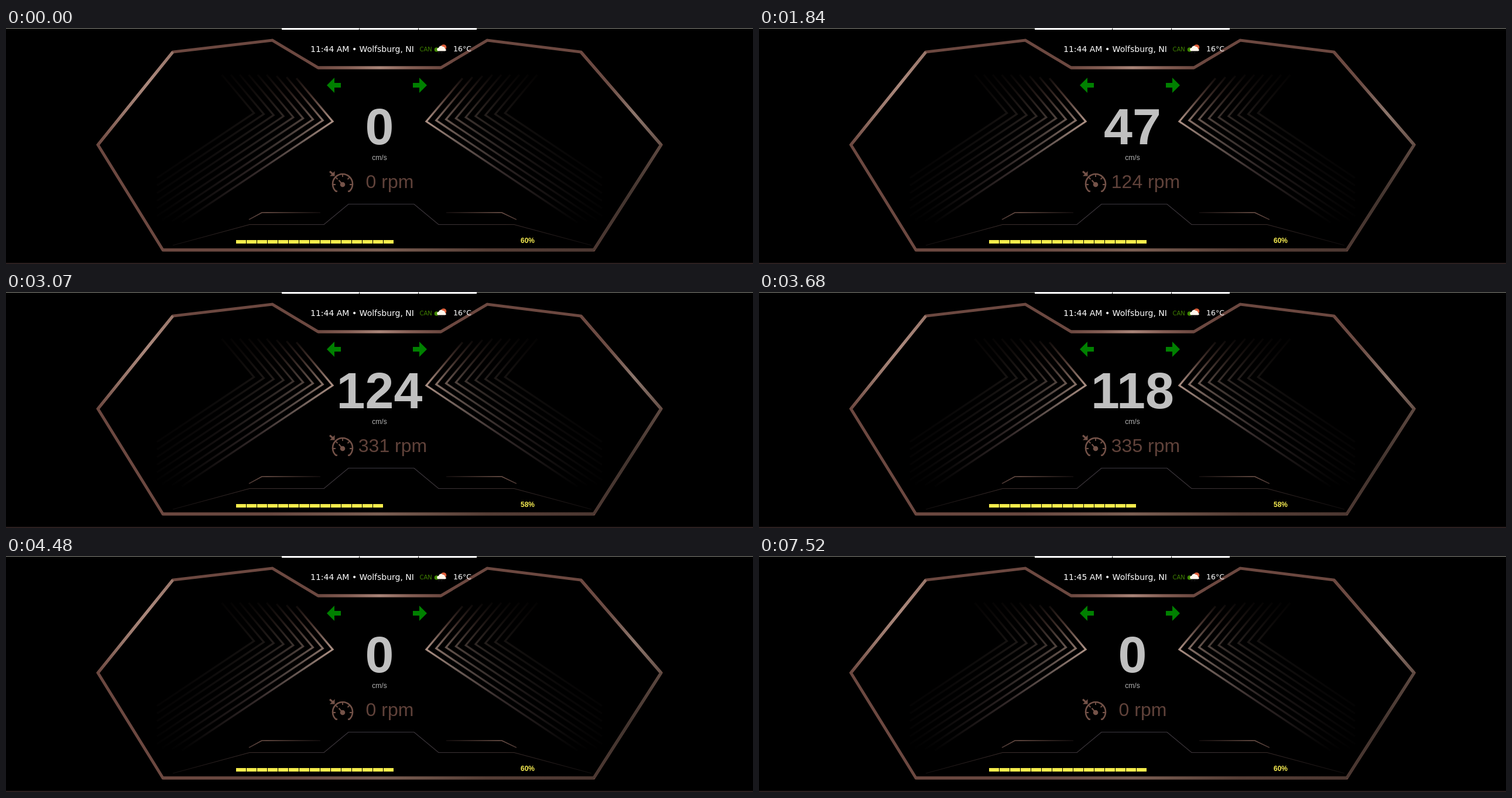
An HTML page that plays this animation: 1276x404 px, repeating every 8000 ms.

```html
<!DOCTYPE html>
<html lang="en">
<head>
<meta charset="utf-8">
<title>Dashboard</title>
<style>
  html, body { margin: 0; width: 100%; height: 100%; overflow: hidden; background: #000; }
  svg { display: block; width: 1276px; height: 404px; }
  .sans { font-family: "Liberation Sans", Arial, sans-serif; }
  .deja { font-family: "DejaVu Sans", sans-serif; }
</style>
</head>
<body>
<svg id="stage" viewBox="0 0 1276 404" fill="none">
  <defs id="defs">
    <linearGradient id="fadeLine" gradientUnits="userSpaceOnUse" x1="280" x2="996">
      <stop offset="0" stop-color="#120e0e"/><stop offset=".2" stop-color="#3c2e2c"/>
      <stop offset=".5" stop-color="#3c3a44"/><stop offset=".8" stop-color="#3c2e2c"/>
      <stop offset="1" stop-color="#120e0e"/>
    </linearGradient>
    <linearGradient id="fadeLeft" gradientUnits="userSpaceOnUse" x1="415" x2="537">
      <stop offset="0" stop-color="#44322e"/><stop offset=".25" stop-color="#76584e"/>
      <stop offset="1" stop-color="#140e0e"/>
    </linearGradient>
    <linearGradient id="fadeRight" gradientUnits="userSpaceOnUse" x1="872" x2="752">
      <stop offset="0" stop-color="#44322e"/><stop offset=".25" stop-color="#76584e"/>
      <stop offset="1" stop-color="#140e0e"/>
    </linearGradient>
  </defs>

  <path d="M0 .5H1276" stroke="#8c8c84"/>
  <path d="M471 1.5H603M604 1.5H704M705 1.5H804" stroke="#fff" stroke-width="3"/>
  <path d="M0 403H1276" stroke="#2c2020" stroke-width="2"/>

  <g id="chevrons" stroke-width="3.2"></g>
  <g id="frame" stroke-width="5"></g>

  <path d="M285 372L416 336.5H543L585 301.5H697L739 336.5H868L1000 372" stroke="url(#fadeLine)" stroke-width="1.2"/>
  <path d="M415 328L437 316H537" stroke="url(#fadeLeft)" stroke-width="1.7"/>
  <path d="M872 328L847 316H752" stroke="url(#fadeRight)" stroke-width="1.7"/>

  <g class="deja">
    <text id="clock" x="520" y="41" font-size="14" fill="#fff"></text>
    <text x="706.5" y="39.5" font-size="10" fill="#3f8000">CAN</text>
    <text x="764" y="40" font-size="12.6" fill="#fff"> 16°C</text>
  </g>
  <circle cx="735.5" cy="37" r="3.8" fill="#3f8800"/>
  <circle cx="747.5" cy="33" r="4.8" fill="#e0603c"/>
  <path d="M739 39.5a2.800 2.800 0 0 1 0-5.600a4 4 0 0 1 7-2a4 4 0 0 1 4 4a1.800 1.800 0 0 1 0 3.600z" fill="#fff6ec"/>
  <path d="M740 41l-1 2M745 41l-1 2" stroke="#303030"/>

  <path id="leftArrow" d="M548 98L561 85V94H572V102H561V111Z"/>
  <path d="M719 98L706 85V94H695V102H706V111Z" fill="#008000"/>

  <g class="sans">
    <text id="speed" x="638" y="199" font-size="88" font-weight="700" text-anchor="middle" fill="#c0c0c0"></text>
    <text x="638" y="226" font-size="12" text-anchor="middle" fill="#b4b4b4">cm/s</text>
    <text id="rpm" y="274" font-size="32" fill="#60423a"></text>
    <text id="percent" x="879" y="368" font-size="12" font-weight="700" fill="#f4ea50"></text>
  </g>

  <g stroke="#745248" stroke-width="2.6">
    <path d="M566 279.5H563.5A17 17 0 1 1 586.500 279.500H584"/>
    <path d="M575 250V255M563.500 256L566.500 259M586.500 256L583.500 259M558.500 268H563M587 268H591.500" stroke-width="1.8"/>
    <path d="M575 268L568.500 260.500" stroke-width="2"/>
    <path d="M553 245.500L559 250.500" stroke-width="3"/>
    <circle cx="575" cy="268" r="4.300" fill="#745248" stroke="none"/>
    <path d="M561.500 245V253.500H553Z" fill="#745248" stroke="none"/>
  </g>

  <g id="cells" fill="#f6ec4c"></g>
</svg>
<script>
const LOOP = 8000;
const $ = id => document.getElementById(id);

function add(parent, tag, attrs) {
  const node = document.createElementNS("http://www.w3.org/2000/svg", tag);
  for (const key in attrs) node.setAttribute(key, attrs[key]);
  return parent.appendChild(node);
}

function gradient(id, geometry, colors, offsets) {
  const node = add($("defs"), "linearGradient", { id, gradientUnits: "userSpaceOnUse", ...geometry });
  colors.forEach((color, i) => add(node, "stop", {
    offset: offsets ? offsets[i] : i / (colors.length - 1), "stop-color": color
  }));
  return `url(#${id})`;
}

function buildFrame() {
  const corners = [[157, 200], [285, 41], [455, 21], [533, 68], [743, 68],
                   [822, 21], [982, 41], [1119, 200], [1004, 380], [268, 380]];
  const base = "#6c4840";
  // Edge index -> colours along that edge
  const shades = {
    0: [base, "#98766a", "#aa887c", "#98766a"],
    3: [base, "#845e54", "#a88478", "#845e54", base],
    6: [base, "#6c4c44", "#8c766c", "#665048"],
    7: ["#5c4840", "#43352f", "#4c3832"],
    8: ["#4c3832", "#563e36", "#7c6054", "#684840", base]
  };
  add($("frame"), "polygon", { points: corners.join(" "), stroke: base });
  for (const i in shades) {
    const [x1, y1] = corners[i], [x2, y2] = corners[(+i + 1) % corners.length];
    const stroke = gradient("edge" + i, { x1, y1, x2, y2 }, shades[i]);
    add($("frame"), "path", { d: `M${x1} ${y1}L${x2} ${y2}`, stroke });
  }
}

function buildChevrons() {
  const sides = ["", "translate(1276) scale(-1 1)"].map(transform => add($("chevrons"), "g", { transform }));
  const colors = ["#000", "#48342e", "#ac9084", "#70605a", "#342a2a", "#0c0a0a", "#000"];
  for (let i = 0; i < 9; i++) {
    const x = 558 - 16.8 * i, y = 160 - 1.8 * i;
    const top = Math.max(80, 86 - 2 * i), reach = Math.min(258, x - 258);
    const stroke = gradient("chevron" + i, { x1: 0, y1: y - 84, x2: 0, y2: y + 176 },
                            colors, [0, 0.16, 0.323, 0.45, 0.65, 0.9, 1]);
    const d = `M${x - (y - top) * 0.836} ${top}L${x} ${y}L${x - reach} ${y + 0.67 * reach}`;
    for (const side of sides) add(side, "path", { d, stroke, opacity: 0.77 ** i });
  }
}

// time, speed, rpm, charge, updates until the next row
const rows = [
  [0, 0, 0, 60, 1], [1650, 3, 8, 60, 4], [1840, 47, 124, 60, 5],
  [2040, 84, 223, 60, 4], [2250, 110, 293, 60, 4], [2410, 120, 319, 60, 1],
  [2660, 121, 323, 59, 3], [2840, 123, 329, 59, 1], [3070, 124, 331, 58, 8],
  [3520, 126, 336, 58, 1], [3680, 118, 335, 58, 12], [4130, 14, 58, 59, 9],
  [4480, 0, 0, 60, 1], [LOOP, 0, 0, 60, 1]
];

// start, end and final brightness of each turn signal change
const blinks = [[5510, 5540, 1], [5880, 5920, 0], [6240, 6380, 1],
                [6810, 6910, 0], [7270, 7340, 1], [7480, 7520, 0]];

function readings(t) {
  const i = rows.findIndex((row, k) => t < rows[k + 1][0]);
  const a = rows[i], b = rows[i + 1], steps = a[4];
  const p = Math.floor((t - a[0]) / (b[0] - a[0]) * steps) / steps;
  const mix = k => Math.round(a[k] + (b[k] - a[k]) * p);
  return { speed: mix(1), rpm: mix(2), charge: a[3] };
}

function signal(t) {
  let level = 0;
  for (const [start, end, goal] of blinks) {
    const p = Math.min(1, Math.max(0, (t - start) / (end - start)));
    level += (goal - level) * p;
  }
  return level;
}

buildFrame();
buildChevrons();
const cells = Array.from({ length: 15 }, (_, i) =>
  add($("cells"), "rect", { x: 393 + 18 * i, y: 363, width: 17, height: 6 }));

function draw(t) {
  const { speed, rpm, charge } = readings(t);
  $("speed").textContent = speed;
  $("rpm").textContent = rpm + " rpm";
  $("rpm").setAttribute("x", 621 - 6.4 * String(rpm).length);
  $("percent").textContent = charge + "%";
  cells.forEach((cell, i) => cell.setAttribute("visibility", i < Math.floor(charge / 4) ? "visible" : "hidden"));
  $("clock").textContent = `11:${t < 6280 ? 44 : 45} AM • Wolfsburg, NI`;
  $("leftArrow").setAttribute("fill", `rgb(0,${Math.round(128 + 127 * signal(t))},0)`);
}

const start = performance.now();
function tick() {
  draw((performance.now() - start) % LOOP);
  requestAnimationFrame(tick);
}
tick();
</script>
</body>
</html>
```
